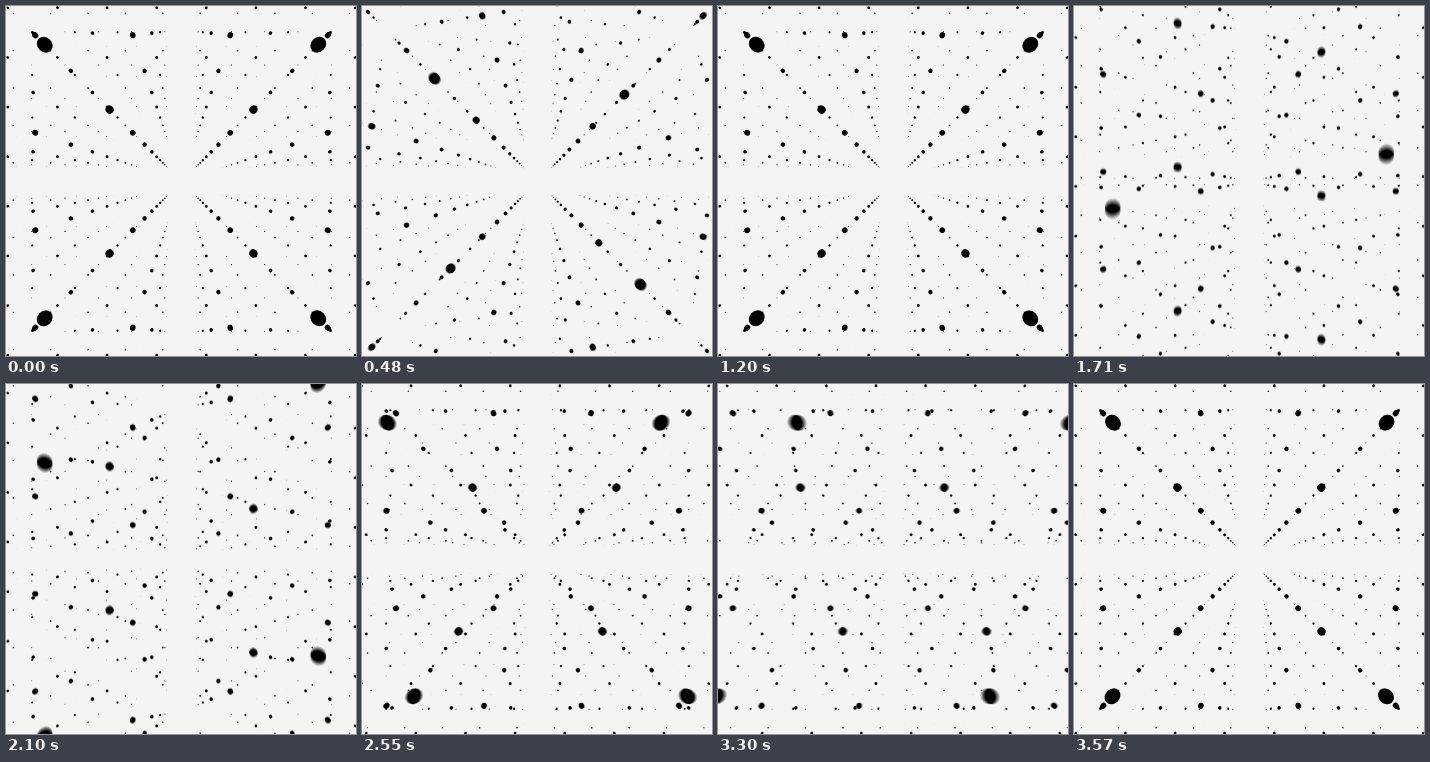
Recreate the animation shown at these times as an HTML page with a canvas. Size 350x350 px, loop 3.6 s.

```html
<!DOCTYPE html>
<html lang="en">
<head>
<meta charset="utf-8">
<title>Sliding lattice</title>
<style>
  html, body { margin: 0; width: 100%; height: 100%; overflow: hidden; background: #f4f4f4; }
  canvas { display: block; width: 350px; height: 350px; }
</style>
</head>
<body>
<canvas id="stage" width="350" height="350"></canvas>
<script>
const SIZE = 350, MID = SIZE / 2;
const CENTER = MID + 0.5;
const FOCAL = MID / Math.tan(Math.PI / 6);
const NEAR_GAP = 0.108;   // distance from the camera to the nearest layer
const FAR = 12;           // distance at which spheres have shrunk to nothing
const RADIUS = 0.025;     // sphere radius, in lattice cells
const EDGE = 0.42;        // outline added around each sphere, in pixels
const FRAME = 30, LOOP = 3600, PHASE = 1200;
const SHUTTER = 0.65, SAMPLES = 8;

const ctx = document.getElementById('stage').getContext('2d');
const buffer = document.createElement('canvas');
buffer.width = buffer.height = SIZE;
const pen = buffer.getContext('2d');

const ease = p => p * p * (3 - 2 * p);
const sign = n => (n & 1 ? 1 : -1);

function drawSphere(x, y, depth) {
  const distance = Math.hypot(x, y, depth);
  if (depth < 0.5 || distance >= FAR) return;
  const scale = FOCAL / depth;
  const px = x * scale, py = y * scale;
  const fade = 1 - (distance / FAR) ** 3;
  const r = (RADIUS * scale + EDGE) * fade;
  const stretched = (RADIUS * scale * distance / depth + EDGE) * fade;
  if (Math.max(Math.abs(px), Math.abs(py)) > CENTER + stretched) return;
  pen.beginPath();
  pen.ellipse(CENTER + px, CENTER + py, stretched, r, Math.atan2(py, px), 0, Math.PI * 2);
  pen.fill();
}

// Neighbouring lines of spheres slide one cell in opposite directions:
// first in depth, then vertically, then horizontally.
function drawLattice(time) {
  const phase = Math.floor(time / PHASE) % 3;
  const shift = ease((time % PHASE) / PHASE);
  pen.fillStyle = '#f4f4f4';
  pen.fillRect(0, 0, SIZE, SIZE);
  pen.fillStyle = '#000';
  for (let layer = 0; layer <= FAR; layer++) {
    const depth = layer + NEAR_GAP;
    const reach = Math.ceil((depth + 1) * MID / FOCAL) + 2;
    for (let col = -reach; col < reach; col++) {
      for (let row = -reach; row < reach; row++) {
        const x = col + 0.5, y = row + 0.5;
        if (phase === 0) drawSphere(x, y, depth - shift * sign(col + row));
        else if (phase === 1) drawSphere(x, y + shift * sign(col + layer), depth);
        else drawSphere(x + shift * sign(row + layer), y, depth);
      }
    }
  }
}

function render(frame) {
  for (let k = 0; k < SAMPLES; k++) {
    drawLattice(FRAME * (frame + SHUTTER * k / (SAMPLES - 1)));
    ctx.globalAlpha = 1 / (k + 1);
    ctx.drawImage(buffer, 0, 0);
  }
}

const start = performance.now();
let shown = -1;
function tick() {
  const frame = Math.floor((performance.now() - start) % LOOP / FRAME);
  if (frame !== shown) render(shown = frame);
  requestAnimationFrame(tick);
}
tick();
</script>
</body>
</html>
```
